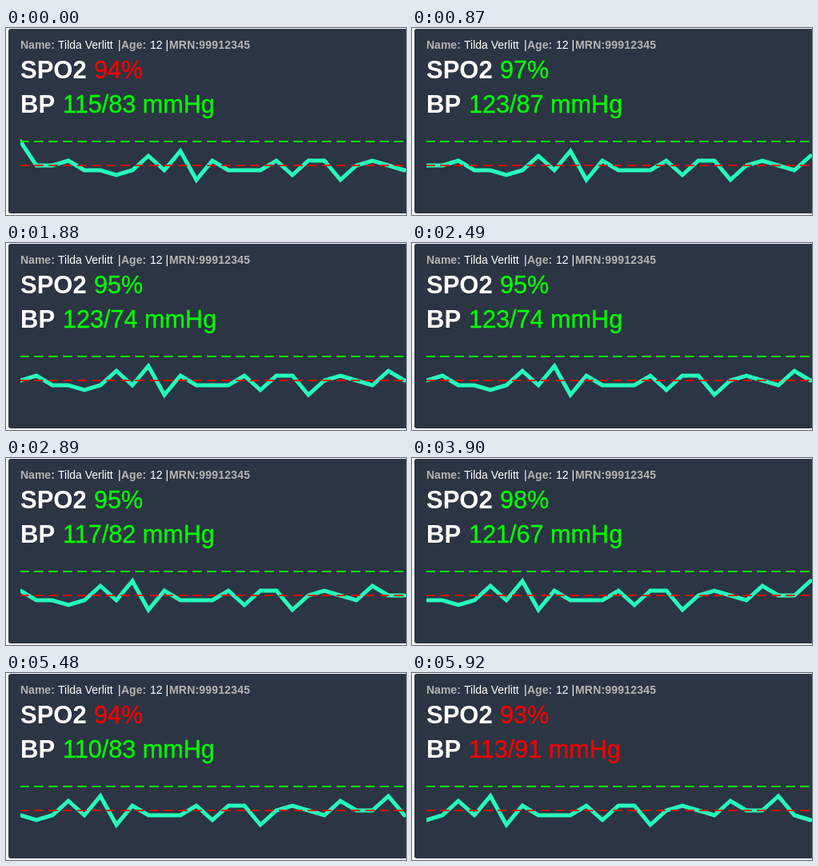
Animation of 500 by 234 pixels, one loop 6.62 s. Source, as an HTML page:

```html
<!DOCTYPE html>
<html lang="en">
<head>
<meta charset="utf-8">
<title>Patient monitor</title>
<style>
  html, body { margin: 0; width: 100%; height: 100%; overflow: hidden; background: #fff; }
  svg { display: block; width: 500px; height: 234px; font-family: Arial, "Liberation Sans", sans-serif; }
  .info { font-size: 14px; fill: #fff; }
  .key { font-weight: bold; fill: #b4b4b4; }
  .label { font-size: 31px; font-weight: bold; fill: #fff; }
  .value { font-size: 30.6px; fill: #0f0; stroke: #0f0; stroke-width: .35; }
  .alarm { fill: #f00; stroke: #f00; }
  .plot { fill: none; stroke-linecap: round; }
  .dash { stroke-width: 2; stroke-dasharray: 10 8; }
</style>
</head>
<body>
<svg viewBox="0 0 500 234">
  <clipPath id="area"><rect x="18" y="130" width="482" height="80"/></clipPath>
  <rect x="3" y="1" width="520" height="231" rx="3" fill="#2b3543"/>

  <g class="info">
    <text class="key" x="18" y="26">Name:</text>
    <text x="65" y="26">Tilda Verlitt</text>
    <text x="140" y="26">|</text>
    <text class="key" x="144" y="26">Age:</text>
    <text x="180" y="26">12 |</text>
    <text class="key" x="204" y="26" letter-spacing=".2">MRN:99912345</text>
  </g>

  <text class="label" x="18" y="63">SPO2</text>
  <text class="value" id="spo2" x="110" y="63"></text>
  <text class="label" x="18" y="106">BP</text>
  <text class="value" id="bp" x="71" y="106"></text>

  <g class="plot" clip-path="url(#area)">
    <polyline id="trace" stroke="#26fcbc" stroke-width="5"/>
    <path class="dash" id="high" stroke="#0f0"/>
    <path class="dash" id="low" stroke="#f00"/>
  </g>
</svg>
<script>
  const LOOP = 6620, POINTS = 25, LOW = 95, HIGH = 100, MAX_DIASTOLIC = 90;

  // pressure shown from each moment (ms)
  const pressure = {
    0: "115/83", 870: "123/87", 1880: "123/74", 2890: "117/82",
    3900: "121/67", 4830: "110/83", 5920: "113/91"
  };
  const times = Object.keys(pressure).map(Number);

  // key points of the oxygen signal; the window slides one reading per update
  const signal = [
    100, 95, 95, 96, 94, 94, 93, 94, 97, 94, 98, 92, 96, 94, 94, 94,
    96, 93, 96, 96, 92, 95, 96, 95, 94, 97, 95, 95, 98, 94, 93
  ];

  const byId = id => document.getElementById(id);
  const px = k => 18 + k * 20;
  const py = v => 142 + (HIGH - v) * 6;

  function show(id, text, alarm) {
    byId(id).textContent = text;
    byId(id).classList.toggle("alarm", alarm);
  }

  function rule(id, level) {
    byId(id).setAttribute("d", `M${px(0)} ${py(level)}H${px(POINTS - 1)}`);
  }

  function draw(i) {
    const shown = signal.slice(i, i + POINTS);
    const oxygen = shown[POINTS - 1];
    const bp = pressure[times[i]];
    show("spo2", `${oxygen}%`, oxygen < LOW);
    show("bp", `${bp} mmHg`, bp.split("/")[1] > MAX_DIASTOLIC);
    byId("trace").setAttribute("points", shown.map((v, k) => `${px(k)},${py(v)}`).join(" "));
  }

  rule("high", HIGH);
  rule("low", LOW);

  const start = performance.now();
  let current = -1;

  function tick() {
    const t = (performance.now() - start) % LOOP;
    const i = times.filter(at => at <= t).length - 1;
    if (i !== current) draw(current = i);
    requestAnimationFrame(tick);
  }
  tick();
</script>
</body>
</html>
```
